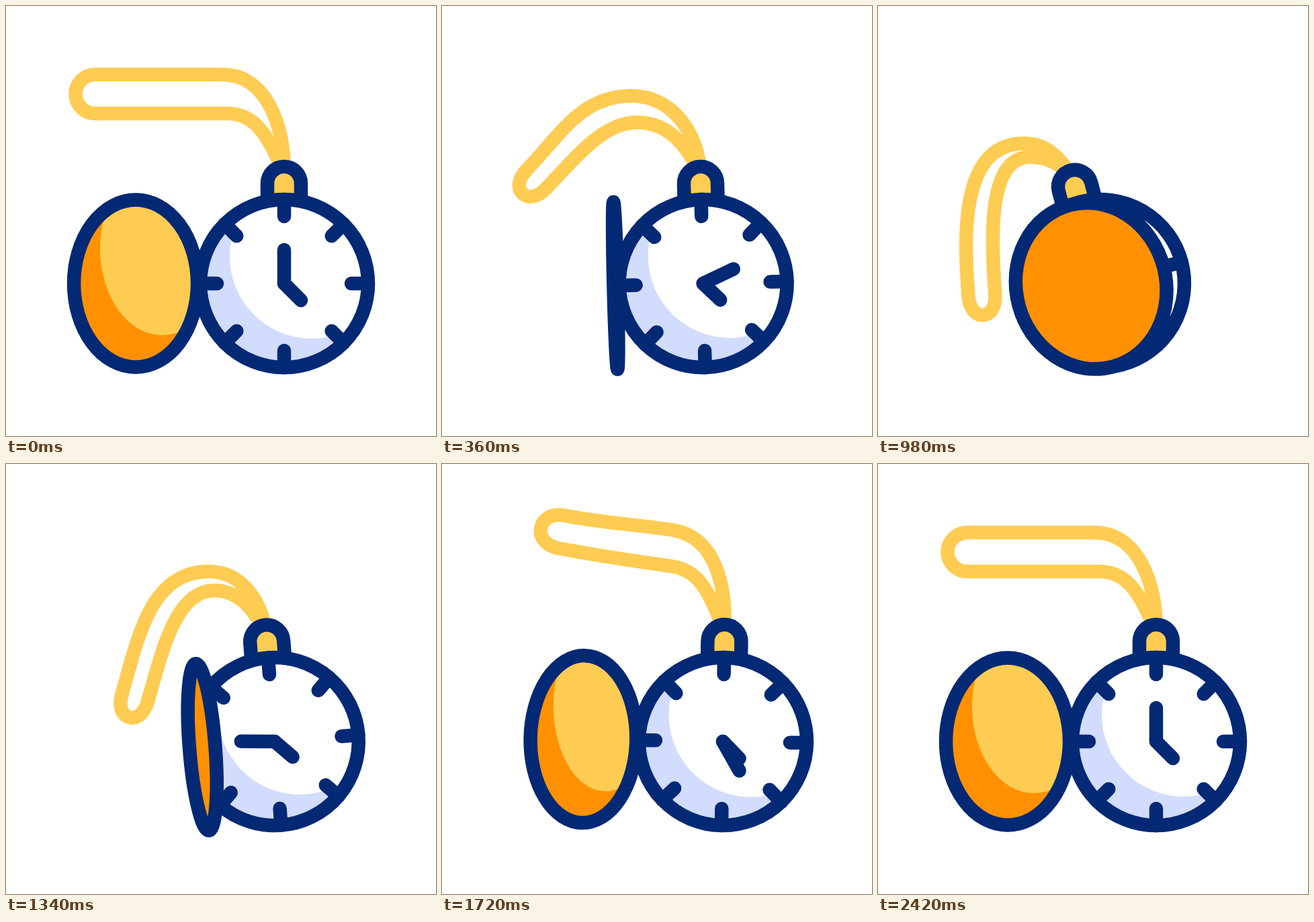
Recreate the animation shown at these times as an HTML page with a canvas. Size 640 px wide and 640 px high, loop 3000 ms.

```html
<!DOCTYPE html>
<html lang="en">
<head>
<meta charset="utf-8">
<title>Pocket watch</title>
<style>
  html, body { margin: 0; width: 100%; height: 100%; overflow: hidden; background: #fff; }
  canvas { display: block; width: 640px; height: 640px; }
</style>
</head>
<body>
<canvas id="stage" width="640" height="640"></canvas>
<script>
const ctx = document.getElementById('stage').getContext('2d');
const NAVY = '#032975', YELLOW = '#fecc52', ORANGE = '#ff9100', LILAC = '#d2dcfd', WHITE = '#fff';
const LOOP = 3000, RADIUS = 125, LINE = 20.5, CENTER_Y = 413, TAU = Math.PI * 2;
const rad = deg => deg * Math.PI / 180;

// Motion as [time, value] keys, eased in and out between them.
const WATCH_X = [[123, 414], [820, 320], [835, 320], [1540, 419], [2160, 414]];
const TILT = [[260, 0], [815, -16], [850, -16], [1640, 1], [2160, 0]];
const LID = [[0, -92], [820, 125], [1880, -92]];
const MINUTE = [[0, 0], [2400, 1080]];
const BEND_X = [[100, 326], [730, 219], [920, 219], [1590, 345], [2160, 326]];
const BEND_Y = [[130, 131], [815, 216], [915, 216], [1840, 121], [2160, 131]];
const END_X = [[0, 133], [700, 147], [850, 148], [1400, 193], [1920, 168], [2160, 133]];
const END_Y = [[50, 131], [745, 432], [1100, 430], [1910, 48], [2160, 131]];

function track(keys, t) {
  const next = keys.findIndex(([time]) => t < time);
  if (next === 0) return keys[0][1];
  if (next < 0) return keys[keys.length - 1][1];
  const [t0, a] = keys[next - 1], [t1, b] = keys[next];
  const u = (t - t0) / (t1 - t0);
  return a + (b - a) * u * u * (3 - 2 * u);
}

function stroke(color) {
  ctx.strokeStyle = color;
  ctx.lineWidth = LINE;
  ctx.stroke();
}

function fill(color) {
  ctx.fillStyle = color;
  ctx.fill();
}

function ellipse(x, y, rx, ry = rx) {
  ctx.beginPath();
  ctx.ellipse(x, y, rx, ry, 0, 0, TAU);
}

function ray(deg, from, to) {
  const c = Math.sin(rad(deg)), s = -Math.cos(rad(deg));
  ctx.beginPath();
  ctx.moveTo(c * from, s * from);
  ctx.lineTo(c * to, s * to);
  stroke(NAVY);
}

// Moves a point along a heading and sideways to its right.
function offset([x, y], heading, along, side) {
  const c = Math.cos(rad(heading)), s = Math.sin(rad(heading));
  return [x + c * along - s * side, y + s * along + c * side];
}

// Smooth curve between two points with headings; pull sets the handle lengths.
function curve(from, to, pullOut = 0.39, pullIn = 0.39) {
  const chord = Math.hypot(to.at[0] - from.at[0], to.at[1] - from.at[1]);
  ctx.bezierCurveTo(
    ...offset(from.at, from.heading, chord * pullOut, 0),
    ...offset(to.at, to.heading, -chord * pullIn, 0), ...to.at);
}

// A loop of two strands running from the watch over a bend to a rounded end.
function drawCord(t, x, tilt) {
  const bend = [track(BEND_X, t), track(BEND_Y, t)];
  const end = [track(END_X, t), track(END_Y, t)];
  const droop = Math.atan2(end[1] - bend[1], bend[0] - end[0]) * 180 / Math.PI;
  const bendDir = -180 - Math.min(droop, 0), endDir = -180 - 1.3 * droop;
  const gap = 29 - 0.26 * Math.abs(droop);
  const endGap = Math.max(20, 29 - 0.5 * Math.abs(droop));
  const anchor = offset([x, CENTER_Y], tilt - 90, 165, 0);

  const rise = { at: anchor, heading: 2.3 * tilt - 90 };
  const bendTop = { at: offset(bend, bendDir, 4, gap), heading: bendDir };
  const endTop = { at: offset(end, endDir, 0, endGap), heading: endDir };
  const tip = { at: offset(end, endDir, 29.5, 0), heading: endDir - 90 };
  const endLow = { at: offset(end, endDir, 0, -endGap), heading: endDir - 180 };
  const bendLow = { at: offset(bend, bendDir, -4, -gap), heading: bendDir - 180 };
  const fall = { at: anchor, heading: 1.4 * tilt - 296 };

  ctx.beginPath();
  ctx.moveTo(...anchor);
  curve(rise, bendTop);
  curve(bendTop, endTop);
  curve(endTop, tip);
  curve(tip, endLow);
  curve(endLow, bendLow, 0.39, 0.3);
  curve(bendLow, fall);
  stroke(YELLOW);
}

function drawCrown() {
  const half = 25, top = -149;
  ctx.beginPath();
  ctx.moveTo(-half, -RADIUS);
  ctx.lineTo(-half, top);
  ctx.arc(0, top, half, Math.PI, TAU);
  ctx.lineTo(half, -RADIUS);
  fill(YELLOW);
  stroke(NAVY);
}

// Fills an ellipse in the shade colour with an offset lit area on top.
function shaded(outline, shade, lit, light) {
  ctx.save();
  ellipse(...outline);
  fill(shade);
  ctx.clip();
  ellipse(...lit);
  fill(light);
  ctx.restore();
}

function drawFace(minute) {
  shaded([0, 0, RADIUS], LILAC, [41, -40, 122], WHITE);
  ellipse(0, 0, RADIUS);
  stroke(NAVY);
  for (let deg = 0; deg < 360; deg += 45) ray(deg, 100, RADIUS);
  ray(minute, 0, 50);
  ray(135, 0, 35.4);
}

// Negative swing shows the lit inside of the lid, positive its plain back.
function drawLid(swing) {
  const x = 1.016 * swing - 127.5, rx = Math.max(Math.abs(swing), 0.5), ry = 124.5;
  const lit = swing < 0 ? YELLOW : ORANGE;
  shaded([x, 0, rx, ry], ORANGE, [x + 0.424 * rx, -52, rx, 129], lit);
  ellipse(x, 0, rx, ry);
  stroke(NAVY);
}

function draw(t) {
  const x = track(WATCH_X, t), tilt = track(TILT, t);
  ctx.fillStyle = WHITE;
  ctx.fillRect(0, 0, 640, 640);
  ctx.lineCap = ctx.lineJoin = 'round';
  drawCord(t, x, tilt);
  ctx.save();
  ctx.translate(x, CENTER_Y);
  ctx.rotate(rad(tilt));
  drawCrown();
  drawFace(track(MINUTE, t));
  drawLid(track(LID, t));
  ctx.restore();
}

const start = performance.now();
function tick() {
  draw((performance.now() - start) % LOOP);
  requestAnimationFrame(tick);
}
tick();
</script>
</body>
</html>
```
